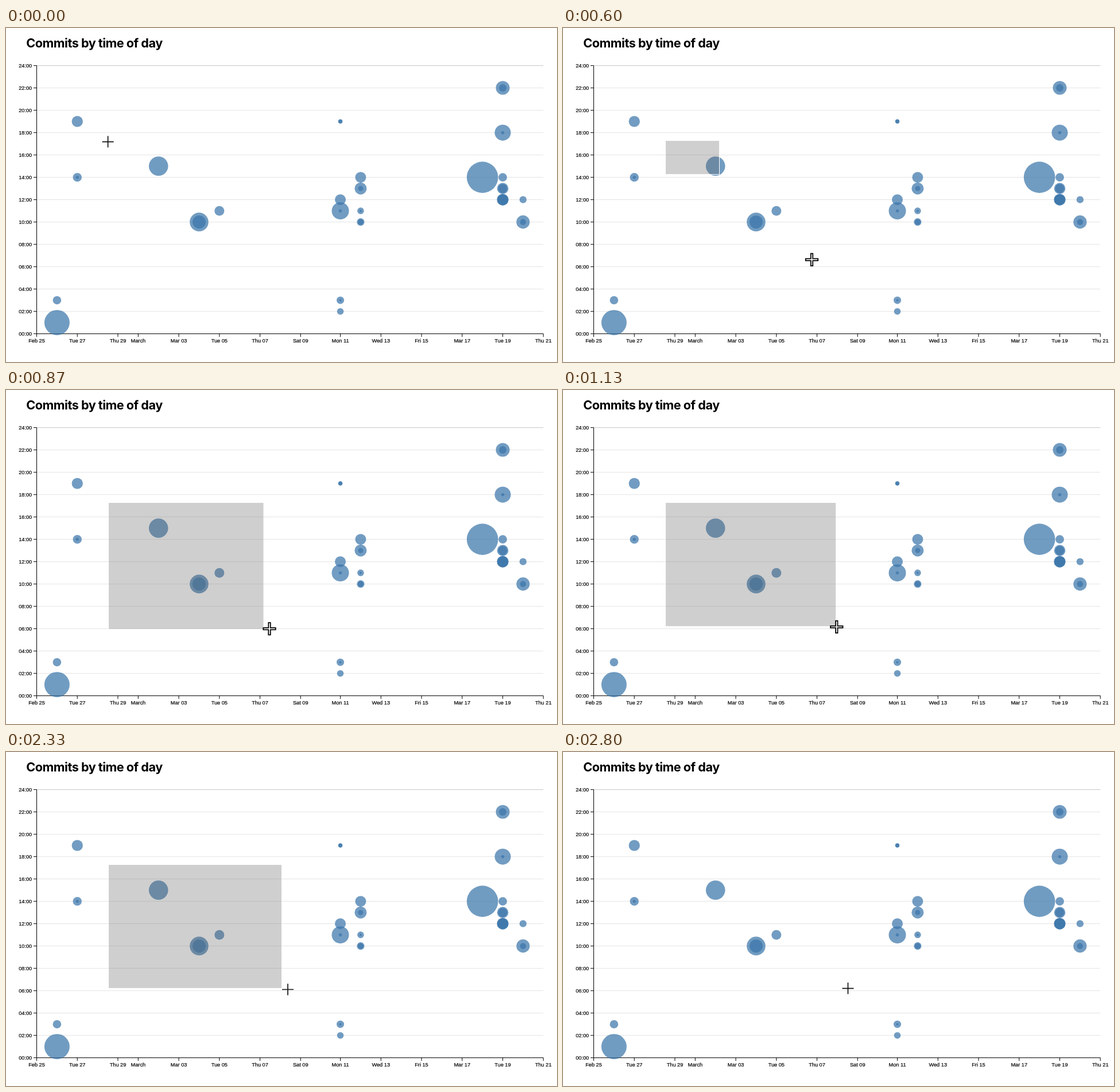
Recreate the animation shown at these times as an HTML page. Size 960x583 px, loop 3530 ms.

```html
<!DOCTYPE html>
<html lang="en">
<head>
<meta charset="utf-8">
<title>Commits by time of day</title>
<style>
  html, body { margin: 0; width: 100%; height: 100%; overflow: hidden; background: #fff; }
  svg { display: block; width: 960px; height: 583px; }
  text { font: 9.2px "Liberation Sans", Arial, sans-serif; stroke: #000; stroke-width: .2px; }
  .title { font: 700 21.6px Inter, sans-serif; letter-spacing: -.48px; stroke: none; }
  .grid { stroke: #e4e4e4; }
  .axis { stroke: #000; fill: none; }
  #dots { fill: #3b76aa; fill-opacity: .72; }
  #brush { fill: #626262; fill-opacity: .3; stroke: #fff; }
  #resize { filter: drop-shadow(0 1.2px 1px rgba(0, 0, 0, .4)); }
  #arrow { stroke-linejoin: round; }
</style>
</head>
<body>
<svg viewBox="0 0 960 583">
  <defs><path id="arrow" d="M-9.5-9.5H-1.5L-4-7L7 4L9.5 1.5V9.5H1.5L4 7L-7-4L-9.5-1.5Z"/></defs>
  <text class="title" x="35.3" y="34.3">Commits by time of day</text>
  <g id="grid"></g>
  <g id="axes"></g>
  <g id="dots"></g>
  <rect id="brush" x="178.5" y="196.5"/>
  <g id="cursor">
    <path id="plain" d="M-10 0H10M0-10V10" stroke="#111" stroke-width="1.7"/>
    <g id="pressed">
      <path d="M-11.6 0H11.6M0-11.6V11.6" stroke="#000" stroke-width="5.2"/>
      <path d="M-9.8 0H9.8M0-9.8V9.8" stroke="#fff" stroke-width="1.7"/>
    </g>
    <g id="resize">
      <use href="#arrow" stroke="#fff" stroke-width="2.6"/>
      <use href="#arrow"/>
    </g>
  </g>
</svg>
<script>
const LOOP = 3530, FPS = 15;
const LEFT = 53.5, RIGHT = 936.2, TOP = 65.6, BOTTOM = 533.7;
const DAYS = 25, HOUR = 1 / 24;

const $ = id => document.getElementById(id);

function add(parent, tag, attrs, text) {
  const el = document.createElementNS("http://www.w3.org/2000/svg", tag);
  for (const key in attrs) el.setAttribute(key, attrs[key]);
  if (text) el.textContent = text;
  $(parent).append(el);
}

// Days count from Feb 25; an hour is lost to daylight saving on day 14.
const dayX = day => LEFT + (day - (day > 14 ? HOUR : 0)) * (RIGHT - LEFT) / (DAYS - HOUR);
const hourY = hour => BOTTOM - hour * (BOTTOM - TOP) / 24;

// The first of a month shows its name, Sundays show the month, other days the weekday.
function dayLabel(date) {
  const format = options => date.toLocaleDateString("en-US", { timeZone: "UTC", ...options });
  if (date.getUTCDate() === 1) return format({ month: "long" });
  const lead = format(date.getUTCDay() === 0 ? { month: "short" } : { weekday: "short" });
  return lead + " " + String(date.getUTCDate()).padStart(2, "0");
}

function drawAxes() {
  for (let h = 0; h <= 24; h += 2) {
    const y = hourY(h);
    add("grid", "path", { class: "grid", d: `M${LEFT} ${y}H${RIGHT}` });
    add("axes", "path", { class: "axis", d: `M${LEFT} ${y}h-5.5` });
    add("axes", "text", { x: 45.2, y: y + 3, "text-anchor": "end" }, String(h).padStart(2, "0") + ":00");
  }
  add("grid", "path", { stroke: "#ccc", d: `M${LEFT} ${TOP}H${RIGHT}` });

  for (let day = 0; day <= DAYS; day++) {
    const date = new Date(Date.UTC(2024, 1, 25 + day));
    if (date.getUTCDate() % 2 === 0) continue;
    const x = dayX(day);
    add("axes", "path", { class: "axis", d: `M${x} ${BOTTOM}v5.5` });
    add("axes", "text", { x, y: 548.7, "text-anchor": "middle" }, dayLabel(date));
  }
  add("axes", "path", { class: "axis", d: `M${LEFT} ${TOP}V${BOTTOM}H${RIGHT}` });
}

// day: { hour: radii stacked there }
const commits = {
  1: { 1: [22], 3: [7.3] },
  2: { 14: [7.7, 2.6], 19: [9.7] },
  6: { 15: [16.8] },
  8: { 10: [16.3, 11.5] },
  9: { 11: [8.5] },
  15: { 2: [5.8], 3: [6.5, 2], 11: [15, 2.7], 12: [9.5], 19: [3.8, 3.4] },
  16: { 10: [6.6, 5], 11: [5.8, 2], 13: [10.5, 4.5], 14: [9.5] },
  22: { 14: [27.3] },
  23: { 12: [10, 10, 9], 13: [9.8, 8], 14: [7.4], 18: [14, 2.6], 22: [12, 6.5] },
  24: { 10: [11.6, 5.3], 12: [6.2] }
};

function drawDots() {
  for (const day in commits)
    for (const hour in commits[day])
      for (const r of commits[day][hour]) add("dots", "circle", { cx: dayX(+day), cy: hourY(+hour), r });
}

const linear = p => p;
const easeIn = p => p ** 3;
const easeOut = p => 1 - (1 - p) ** 2;
const snapOut = p => 1 - (1 - p) ** 6;

// Pointer moves, timed in screen refreshes at FPS.
const PRESS = 4, RELEASE = 24, LEAVE = 35, CLICK = 41;
const home = { x: 177.6, y: 198.6 };
const moves = [
  { from: 0, to: 1, x: 177.5, y: 197.5, ease: linear },
  { from: PRESS, to: 8, x: 272.5, y: 256.5, ease: easeIn },
  { from: 8, to: 11, x: 449, y: 418.6, ease: snapOut },
  { from: 12, to: 17, x: 476.8, y: 413.5, ease: easeOut },
  { from: 21, to: 23, x: 480.5, y: 413.5, ease: linear },
  { from: 23, to: RELEASE, x: 483.5, y: 415.5, ease: linear },
  { from: LEAVE - 1, to: LEAVE, x: 491, y: 414.5, ease: linear },
  { from: LEAVE, to: 37, x: 496.5, y: 412.6, ease: easeOut }
];

function pointer(tick) {
  let { x, y } = home;
  for (const m of moves) {
    const p = m.ease(Math.min(Math.max((tick - m.from) / (m.to - m.from), 0), 1));
    x += (m.x - x) * p;
    y += (m.y - y) * p;
  }
  return { x, y };
}

function cursorShape(tick) {
  if (tick >= PRESS && tick < RELEASE || tick === CLICK) return "pressed";
  return tick >= RELEASE && tick < LEAVE ? "resize" : "plain";
}

function render(t) {
  // The small lead covers times rounded to 10 ms.
  const tick = Math.floor((t + 3.4) * FPS / 1000);
  const { x, y } = pointer(tick);
  const shape = cursorShape(tick);
  $("cursor").setAttribute("transform", `translate(${x} ${y})`);
  for (const id of ["plain", "pressed", "resize"]) $(id).style.display = id === shape ? "" : "none";

  // The selection trails the pointer by one refresh.
  const corner = pointer(Math.min(tick, RELEASE) - 1);
  const visible = tick > PRESS + 1 && tick <= CLICK;
  $("brush").style.display = visible ? "" : "none";
  $("brush").setAttribute("width", Math.max(corner.x - 178.5, 0));
  $("brush").setAttribute("height", Math.max(corner.y - 197.4, 0));
}

drawAxes();
drawDots();
const start = performance.now();
function loop() {
  render((performance.now() - start) % LOOP);
  requestAnimationFrame(loop);
}
render(0);
requestAnimationFrame(loop);
</script>
</body>
</html>
```
